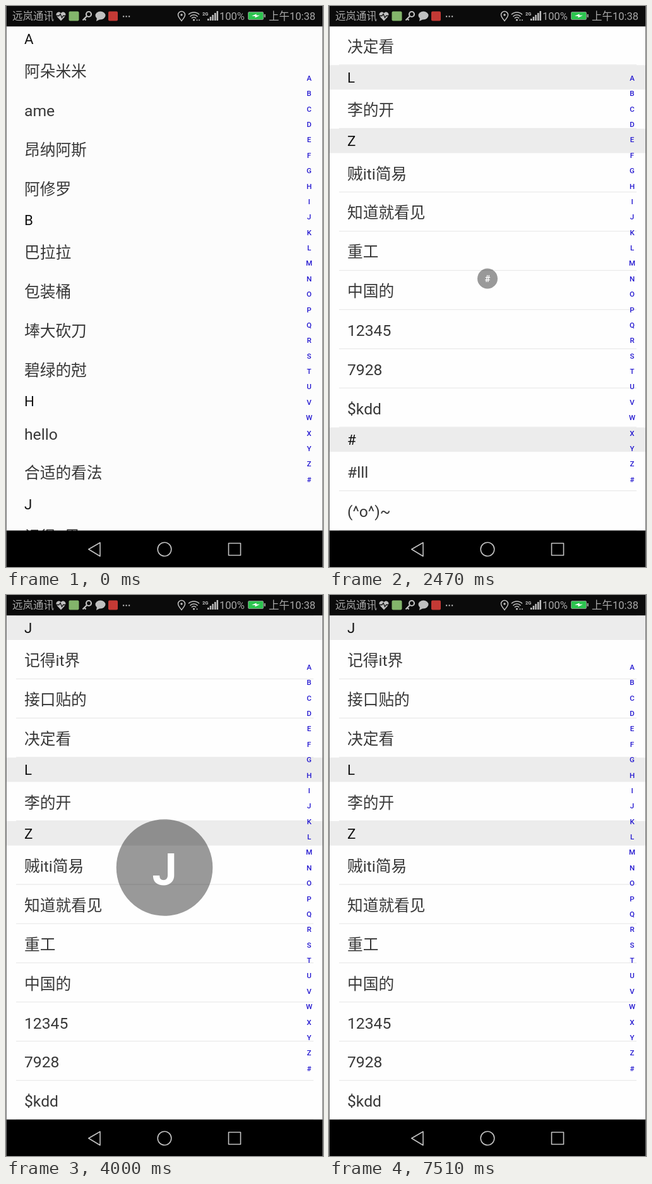
An HTML page for the animation above (7.66 s loop, 502 by 886 pixels).

```html
<!DOCTYPE html>
<html lang="zh-CN">
<head>
<meta charset="utf-8">
<style>
  html, body { margin: 0; width: 100%; height: 100%; overflow: hidden; background: #000; }
  svg { display: block; width: 502px; height: 886px; }
  text { font-family: Roboto, "Noto Sans CJK SC", "Noto Sans CJK", sans-serif; white-space: pre; }
  .row { font-size: 24.7px; fill: #383838; }
  .head { font-size: 22.3px; fill: #111; }
  .index { font-size: 11.5px; font-weight: 500; fill: #2418d0; text-anchor: middle; }
  .status { font-size: 16.5px; fill: #a8a8a8; }
  .band { fill: #ececec; }
  .rule { fill: #e9e9e9; }
  .plain .band, .plain .rule { display: none; }
  #letter { font-size: 70px; font-weight: 700; fill: #fff; text-anchor: middle; }
  .line { fill: none; stroke: #c4c4c4; stroke-width: 1.6; stroke-linejoin: round; }
</style>
</head>
<body>
<svg viewBox="0 0 502 886">
  <rect id="page" width="502" height="886"/>
  <g id="list"></g>
  <g id="index"></g>
  <g id="bubble">
    <circle r="76.3" fill="#000" fill-opacity=".4"/>
    <text id="letter" y="27.5"></text>
  </g>

  <rect width="502" height="32.3" fill="#0b0b0b"/>
  <g fill="#c0c0c0">
    <text class="status" x="10" y="22.3">远岚通讯</text>
    <path d="M87 23.5L80.5 16.5C77 12 83 6.5 87 11.2C91 6.5 97 12 93.5 16.5Z"/>
    <path d="M79 15.5h5l2-3 2.5 6 2-3h5" fill="none" stroke="#0b0b0b" stroke-width="1.3"/>
    <rect x="99.5" y="8.5" width="16" height="15" rx="2" fill="#83b56b"/>
    <g fill="none" stroke="#c0c0c0" stroke-width="2.2">
      <circle cx="131" cy="13" r="4"/>
      <path d="M128 16L121.5 22.5M124 20l2.5 2.5"/>
    </g>
    <ellipse cx="149.5" cy="15" rx="8" ry="6.5"/>
    <path d="M144 19l-1 5 6-3z"/>
    <rect x="162" y="8.5" width="15" height="15" rx="2" fill="#c43a35"/>
    <path d="M185 15.5h2.2v2h-2.2zM189.500 15.5h2.2v2h-2.2zM194 15.5h2.2v2h-2.2z"/>
    <g fill="none" stroke="#c0c0c0" stroke-width="1.5">
      <path d="M278 23.5C274.5 19 272.5 17 272.5 14a5.500 5.500 0 0 1 11 0C283.500 17 281.5 19 278 23.5Z"/>
      <path d="M289 13.5a12 12 0 0 1 17 0M291.5 16.7a8 8 0 0 1 12 0M294 19.5a4.5 4.5 0 0 1 7 0"/>
    </g>
    <circle cx="278" cy="14" r="1.7"/>
    <circle cx="297.5" cy="22" r="1.6"/>
    <circle cx="302.5" cy="22.3" r="1"/>
    <circle id="activity" cx="306" cy="22.3" r="1"/>
    <text x="311" y="14.5" font-size="7.5" font-weight="700">2G</text>
    <path d="M319 23v-3h2.500v3zM322.7 23v-6h2.500v6zM326.3 23v-9h2.500v9zM330 23v-12h2.500v12zM333.5 23v-15h2.500v15z"/>
    <text class="status" x="338" y="21.5">100%</text>
    <rect x="383.500" y="9.5" width="24" height="12" rx="1.5" fill="#2cc44f" stroke="#8a948a"/>
    <rect x="408.5" y="13" width="2.5" height="5" fill="#8a948a"/>
    <path d="M389 16l7.500-3.500v2.200h5.500l-7.500 3.800v-2.500z" fill="#fff"/>
    <text class="status" x="416" y="22.3">上午10:38</text>
  </g>

  <rect y="828.4" width="502" height="58" fill="#000"/>
  <path class="line" d="M130.800 858L149 847.500V869ZM352.500 848.500h19v19h-19z"/>
  <circle class="line" cx="251" cy="858" r="10.8"/>
  <path d="M.5 0V886M501.5 0V886" stroke="#777"/>
</svg>
<script>
const LOOP = 7660, TOP = 32.5, ROW = 61.9, HEAD = 38.5;
const $ = id => document.getElementById(id);

function add(parent, tag, attrs, text = '') {
  const el = document.createElementNS('http://www.w3.org/2000/svg', tag);
  for (const name in attrs) el.setAttribute(name, attrs[name]);
  el.textContent = text;
  parent.append(el);
}

const sections = {
  A: '阿朵米米 ame 昂纳阿斯 阿修罗',
  B: '巴拉拉 包装桶 埲大砍刀 碧绿的尅',
  H: 'hello 合适的看法',
  J: '记得it界 接口贴的 决定看',
  L: '李的开',
  Z: '贼iti简易 知道就看见 重工 中国的 12345 7928 $kdd',
  '#': '#lll (^o^)~'
};

let y = 0;
const sectionTop = {};
for (const key in sections) {
  sectionTop[key] = y;
  add($('list'), 'rect', { class: 'band', x: 0, y, width: 502, height: HEAD });
  add($('list'), 'text', { class: 'head', x: 29, y: y + 27.7 }, key);
  y += HEAD;
  for (const name of sections[key].split(' ')) {
    add($('list'), 'text', { class: 'row', x: 29, y: y + 41.3 }, name);
    y += ROW;
    add($('list'), 'rect', { class: 'rule', x: 16, y: y - 1, width: 471, height: 1.2 });
  }
}
const maxScroll = y - 795.4;

[...'ABCDEFGHIJKLMNOPQRSTUVWXYZ#'].forEach((c, i) =>
  add($('index'), 'text', { class: 'index', x: 480, y: 118 + i * 24.37 }, c));

// Each press: letter, then [time, bubble radius] steps
const presses = [
  ['#', [[960, 61], [1110, 86], [1230, 78], [1350, 76.3], [2470, 16], [2620, 10], [2770, 0]]],
  ['J', [[3610, 61], [3730, 86], [3850, 78], [4000, 76.3], [5110, 7], [5380, 0]]],
  ['P', [[5780, 87], [5930, 78], [6050, 76.3], [7270, 16], [7390, 8], [7510, 0]]]
];

function draw(t) {
  let radius = 0, letter = '';
  for (const [key, steps] of presses)
    for (const [time, r] of steps)
      if (t >= time) { radius = r; letter = key; }

  const scroll = t < 960 ? 0 : t < 3610 ? maxScroll : sectionTop.J;
  $('list').setAttribute('transform', `translate(0 ${TOP - scroll})`);
  $('list').setAttribute('class', t < 960 ? 'plain' : '');
  $('page').setAttribute('fill', t < 960 ? '#fcfcfc' : '#fefefe');
  $('bubble').setAttribute('transform', `translate(251 430.5) scale(${radius / 76.3})`);
  $('letter').textContent = letter;
  $('activity').setAttribute('opacity', t >= 2930 && t < 4960 ? 0 : 1);
}

const start = performance.now();
(function tick() {
  draw((performance.now() - start) % LOOP);
  requestAnimationFrame(tick);
})();
</script>
</body>
</html>
```
